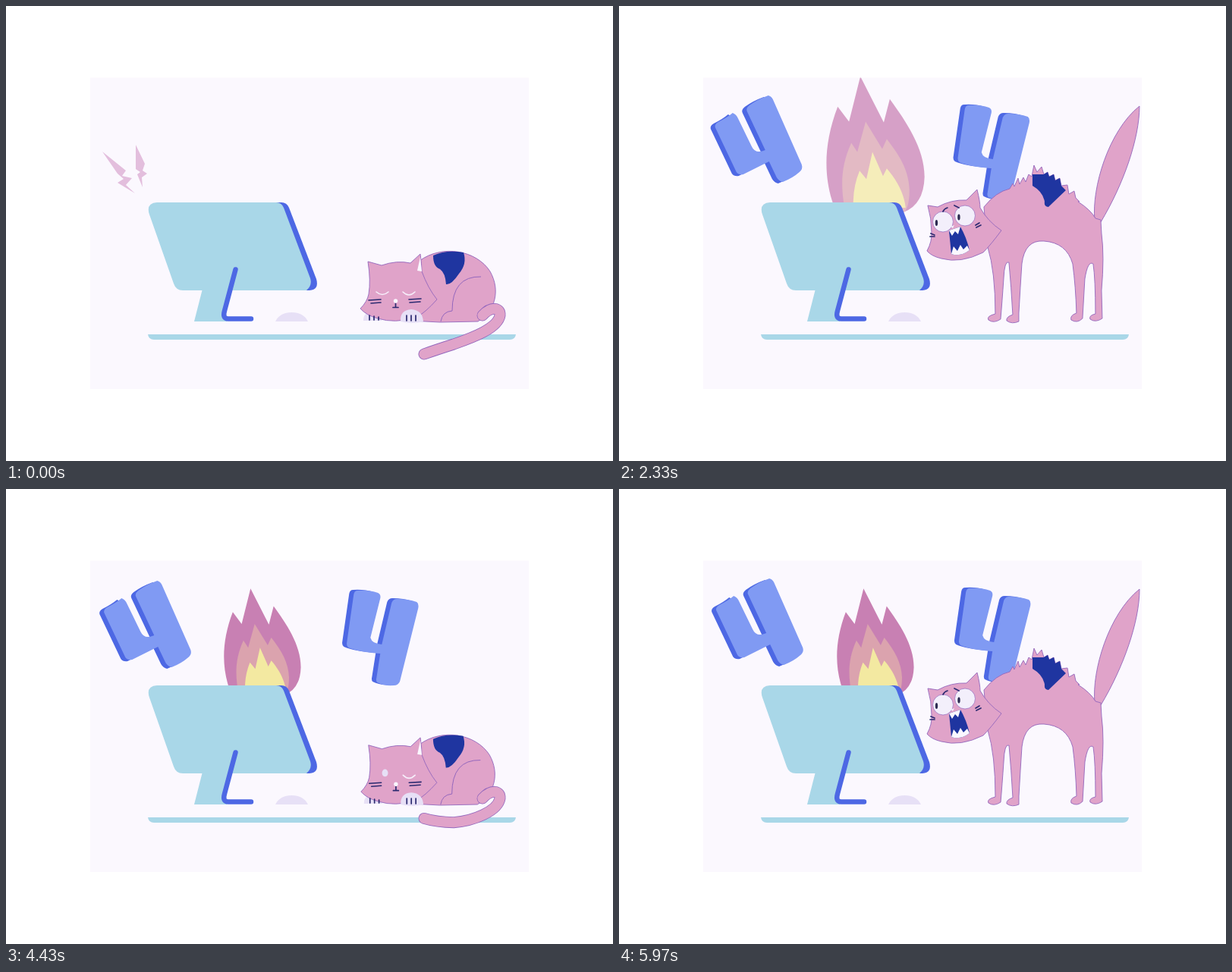
An HTML page that plays this animation: 800 by 600 pixels, repeating every 6 s.

```html
<!DOCTYPE html>
<html lang="en">
<head>
<meta charset="utf-8">
<title>Cat and burning computer</title>
<style>
html, body { margin: 0; width: 100%; height: 100%; overflow: hidden; background: #fff; }
svg { display: block; width: 800px; height: 600px; }
.sky { fill: #a9d7e8; }
.blue { fill: #4d68e4; }
.four { fill: #809af3; }
.lilac { fill: #e7e0f6; }
.navy { fill: #1f35a0; }
.white { fill: #faf7ff; }
.fur { fill: #e0a3c9; stroke: #9367bd; stroke-width: .9; stroke-linejoin: round; }
.line { fill: none; stroke: #2b2a70; stroke-width: 1.7; stroke-linecap: round; }
.thin { fill: none; stroke: #9367bd; stroke-width: 1; }
.lid { fill: none; stroke: #f6eefa; stroke-width: 1.6; stroke-linecap: round; }
.eye { fill: #f3effb; stroke: #9367bd; stroke-width: .7; }
.tail { fill: none; stroke-linecap: round; }
</style>
</head>
<body>
<svg viewBox="0 0 800 600">
  <defs>
    <clipPath id="panel"><path d="M111 94.500H689V505H111Z"/></clipPath>
    <path id="leftFour" d="M133 156Q145 150 152 144Q157 146 159 151L177 188Q182 199 195 193L171 142Q169 138 174 134Q185 126 199 121Q203 122 205 126L243 212Q245 218 240 222Q231 230 218 235Q213 234 210 229L200 208L166 225Q160 226 157 222L129 163Q128 159 133 156Z"/>
    <path id="rightFour" d="M463 134Q478 133 490 137Q494 139 493 144L480 196Q482 204 495 205L508 150Q510 145 515 145Q530 145 541 149Q544 151 543 157L519 253Q517 259 511 259Q498 260 489 255Q487 253 488 249L493 217Q465 215 451 209Q448 207 449 202L458 139Q459 134 463 134Z"/>
  </defs>
  <g clip-path="url(#panel)">
    <path fill="#fbf8fe" d="M111 94H689V505H111Z"/>

    <path id="sparks" fill="#e3bedd" d="M127 192L158 217L153 224L166 227L158 236L170 247L147 233L155 228L147 221ZM171 183L183 208L180 217L186 221L179 226L180 239L173 222L177 219L171 215Z"/>

    <g id="fours">
      <use href="#leftFour" class="blue" x="-6" y="2"/>
      <use href="#leftFour" class="four"/>
      <use href="#rightFour" class="blue" x="-6" y="-1"/>
      <use href="#rightFour" class="four"/>
    </g>

    <g id="fire">
      <path fill="#c880b3" d="M318 92L349 153L357 122C378 151 403 187 403 225Q402 262 375 272L283 264C270 228 268 184 288 132L303 152Z"/>
      <path fill="#dba3ae" d="M325 152L347 188L353 175C371 198 382 217 383 242Q383 265 376 272L297 266C292 236 292 211 306 180L314 192Z"/>
      <path fill="#f3e9a1" d="M334 192L348 224L353 214C366 229 376 247 378 266L309 268Q307 241 317 217L326 228Z"/>
    </g>

    <path class="sky" d="M187 433H672Q671 440 664 440H195Q188 440 187 433ZM259 373H295L285 405Q285 412 292 416H248Z"/>
    <path class="blue" d="M355 259H363Q370 259 373 266L409 360Q413 374 400 375H380Z"/>
    <path class="sky" d="M199 259H356Q363 259 366 266L401 359Q404 368 396 375H233Q224 375 221 366L189 275Q184 260 199 259Z"/>
    <path fill="none" stroke="#4d68e4" stroke-width="6.500" stroke-linecap="round" d="M302.500 347.500L288 402Q285 412.500 293 412.500H323"/>
    <path class="lilac" d="M355 416Q361 404 376.500 404T398 416Z"/>

    <g id="asleep">
      <g id="breath">
        <path class="lilac" d="M471 415Q471 403 483 403T495 415Z"/>
        <path class="fur" d="M545 336C575 314 620 322 638 350C652 375 645 402 622 416L572 417L515 414Z"/>
        <path class="navy" d="M563 329Q580 321 603 325Q608 340 597 353Q587 368 580 367Q579 352 572 347Q563 344 563 329Z"/>
        <path class="thin" d="M626 357Q588 356 588 402Q575 403 573 416"/>
        <path class="fur" d="M477 337L495 342Q515 335 533 339L546 327Q548 340 548 350Q556 372 568 387Q552 405 540 411Q512 419 490 412Q475 408 467 399Q476 390 478 380Q481 362 477 337Z"/>
        <path class="white" d="M546 331L542 349L548 350Z"/>
        <path class="lid" d="M523 377Q531 385 539 377"/>
        <path class="lid" id="lid" d="M488 377Q496 384 504 377"/>
        <ellipse class="lilac" id="peek" cx="499" cy="374" rx="4" ry="5"/>
        <path class="line" d="M478 388L494 387M481 392L494 391M531 387L547 386M532 391L546 390M513.500 392V397M510 397.500H517"/>
        <circle class="white" cx="513.500" cy="389" r="2.700"/>
        <path class="lilac" d="M520 416Q519 401 534 400Q549 401 550 416Q535 420 520 416Z"/>
        <path class="line" d="M479 408V414M485 409V414M491 410V414M528 408V415M534 408V415M540 408V415"/>
      </g>
      <path class="tail" stroke="#9367bd" stroke-width="15"/>
      <path class="tail" stroke="#e0a3c9" stroke-width="13.300"/>
    </g>

    <g id="scared">
      <path class="fur" d="M627 282C623 240 645 165 686 132C686 175 665 235 635 285Z"/>
      <path class="fur" d="M481 265Q497 245 515 241L519 234L521 238L526 227L528 235L533 226L536 232L540 222L544 225L547 210L551 219L557 212L560 222L565 219L567 225L573 222L575 230L581 227L583 237L591 236L593 248L600 244L602 253L607 258L605 258Q622 269 628 280L635 282L636 300Q640 330 636 375L637 412Q628 418 621 413Q619 408 628 406Q628 360 625 340Q618 335 614 360L611 412Q604 419 596 414Q594 408 603 405Q602 370 598 340Q590 312 560 310Q535 308 531 340Q529 370 527 405V416Q518 420 511 415Q510 410 519 407Q517 370 514 338Q508 335 507 360Q505 390 503 413Q494 419 487 414Q484 409 496 406Q496 350 486 318Z"/>
      <path class="navy" d="M545 222L560 222L565 219L567 225L573 222L575 230L581 227L583 237L589 243L566 265Q560 265 561 258Q559 245 545 237Z"/>
      <path class="fur" d="M407 263L420 265Q438 255 458 256L472 242Q476 258 476 266Q486 284 504 296Q490 315 480 325Q450 340 425 333Q412 330 406 323Q413 310 412 298Q412 280 407 263Z"/>
      <circle class="eye" cx="427" cy="284.500" r="13.500"/>
      <circle class="eye" cx="456" cy="276.500" r="13.500"/>
      <ellipse fill="#2b2a50" cx="418.500" cy="286" rx="1.700" ry="4"/>
      <ellipse fill="#2b2a50" cx="448" cy="278.500" rx="1.700" ry="4"/>
      <path class="line" d="M427 271Q429 267 433 266M442 263L448 266M411 300L416 302M410 304H416M470 289L475 286M471 292L477 289"/>
      <path class="navy" d="M435 296L450 291Q458 305 462 322Q450 331 438 327Z"/>
      <path class="white" d="M435 296L439 303L443 297L447 301L450 291ZM438 327L441 317L446 323L450 315L454 321L459 316L462 322Q450 331 438 327Z"/>
      <path fill="#f3effb" d="M437 291L442 289L440 293Z"/>
    </g>
  </g>
</svg>
<script>
const LOOP = 6000, CYCLE = 3000, WAKE = 1600;
const $ = id => document.getElementById(id);
const tails = document.querySelectorAll('.tail');
const clamp = x => Math.min(1, Math.max(0, x));
const span = (t, a, b) => clamp((t - a) / (b - a));
const wave = x => (1 - Math.cos(Math.PI * x)) / 2;
const turn = (t, period) => Math.cos(2 * Math.PI * t / period);

// Flame size: rises once, then pulses between LOW and 1.
const LOW = .78;
const flame = [[0, 0], [200, 0], [560, .92], [740, LOW], [940, 1], [1120, LOW], [1290, 1], [1430, LOW],
  [1600, 1], [1780, LOW], [1970, 1], [2150, LOW], [2350, 1], [2580, LOW], [2830, 1], [2970, LOW], [3000, LOW]];

function flameSize(t) {
  const i = Math.max(1, flame.findIndex(k => k[0] > t));
  const [[t0, a], [t1, b]] = [flame[i - 1], flame[i]];
  return a + (b - a) * wave(span(t, t0, t1));
}

function about(x, y, s, dx = 0, dy = 0) {
  return `translate(${x + dx} ${y + dy}) scale(${s}) translate(${-x} ${-y})`;
}

function show(el, on) {
  el.style.display = on ? '' : 'none';
}

function draw(now) {
  const time = now % LOOP, t = time % CYCLE;

  const spark = span(t, 0, 500);
  $('sparks').setAttribute('transform', about(263, 287, 1 + .1 * spark));
  $('sparks').setAttribute('opacity', 1 - spark);

  const grow = 1 - (1 - span(t, 400, 1090)) ** 2;
  const drift = 2 - 3 * span(t, 1430, 2000);
  show($('fours'), grow > 0);
  $('fours').setAttribute('transform', about(263, 287, grow, 1.3 * turn(t - 1430, 2000) - 1, drift - 2));

  $('fire').setAttribute('transform', about(337.5, 270, flameSize(t)));
  $('fire').setAttribute('opacity', .73 + .27 * span(time, 2450, 2850));

  const awake = t >= WAKE;
  show($('asleep'), !awake);
  show($('scared'), awake);
  $('scared').setAttribute('transform', `translate(${.75 * turn(t - 2970, 126) - .75} 0)`);

  const curl = wave(t / 1100);
  const path = `M628 408C640 395 652 398 651 408C648 425 616 ${437 + curl} 590 ${446 - 8 * curl}` +
    `Q568 ${453 - 17 * curl} 551 ${459 - 31 * curl}`;
  tails.forEach(el => el.setAttribute('d', path));
  $('breath').setAttribute('transform', about(555, 416, 1 - .012 * curl));

  const peek = span(t, 1340, 1430);
  show($('lid'), peek === 0);
  $('peek').setAttribute('ry', 5 * peek);
}

function frame() {
  draw(performance.now());
  requestAnimationFrame(frame);
}
frame();
</script>
</body>
</html>
```
